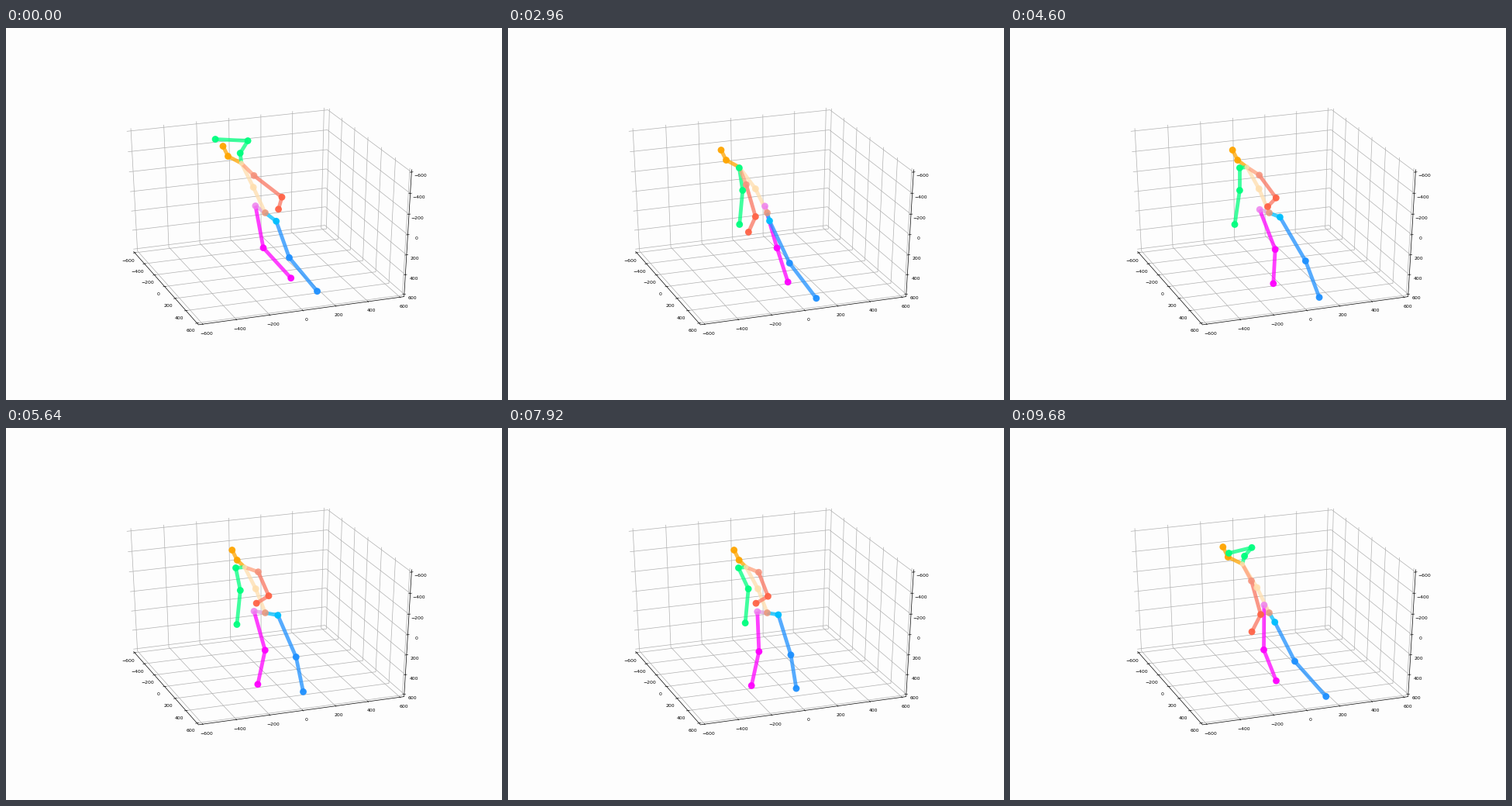
Animation, 640 px wide and 480 px high, one loop 9.72 s. Source, as a matplotlib script:

```python
import numpy as np
import matplotlib.pyplot as plt
from matplotlib.animation import FuncAnimation
from matplotlib.collections import LineCollection
from matplotlib.colors import to_rgba

W, H, FRAMES, STEP = 640, 480, 243, 40
PX = 0.72  # points per pixel at 100 dpi

fig = plt.figure(figsize=(6.4, 4.8), dpi=100, facecolor="#fdfdfd")
ax = fig.add_axes([0, 0, 1, 1])
ax.set_xlim(-0.5, W - 0.5)
ax.set_ylim(H - 0.5, -0.5)
ax.axis("off")

# ---- perspective box ----
ELEV, AZIM, DIST = np.radians(30), np.radians(20), 10
CENTER, SCALE = (334, 237.7), (2681, 1785)
EDGE = 25 / 48


def project(x, y, z):
    """Unit box coordinates to stage pixels."""
    se, ce, sa, ca = np.sin(ELEV), np.cos(ELEV), np.sin(AZIM), np.cos(AZIM)
    away = ca * y - sa * x
    depth = DIST - (away * ce + z * se)
    right = ca * x + sa * y
    up = z * ce - away * se
    return CENTER[0] + SCALE[0] * right / depth, CENTER[1] - SCALE[1] * up / depth


def path(*points):
    return [project(*p) for p in points]


def label(point, value, dx, dy):
    x, y = project(*point)
    ax.text(x + dx, y + dy, str(value).replace("-", "\u2212"), fontsize=6.1 * PX,
            family="DejaVu Sans", ha="center", va="center_baseline", color="black")


grid, ticks = [], []
OUT, IN = EDGE + 1 / 120, EDGE - 1 / 120
for value in range(-600, 601, 200):
    t = value / 1200
    grid.append(path((t, -EDGE, EDGE), (t, -EDGE, -EDGE), (t, EDGE, -EDGE)))
    grid.append(path((EDGE, t, EDGE), (EDGE, t, -EDGE), (-EDGE, t, -EDGE)))
    grid.append(path((-EDGE, -EDGE, t), (EDGE, -EDGE, t), (EDGE, EDGE, t)))
    ticks.append(path((t, IN, -EDGE), (t, OUT, -EDGE)))
    ticks.append(path((-IN, t, -EDGE), (-OUT, t, -EDGE)))
    ticks.append(path((IN, EDGE, t), (OUT, EDGE, t)))
    label((t, EDGE, -EDGE), value, 4.5, 11.5)
    label((-EDGE, t, -EDGE), value, -8.5, 9.5)
    label((EDGE, EDGE, -t), value, 11, 4.5)

frame_edges = path((-EDGE, -EDGE, -EDGE), (-EDGE, EDGE, -EDGE),
                   (EDGE, EDGE, -EDGE), (EDGE, EDGE, EDGE))
for lines, color, width in ((grid, "#b0b0b0", 0.7), ([frame_edges], "black", 0.7),
                            (ticks, "black", 0.6)):
    ax.add_collection(LineCollection(lines, colors=color, linewidths=width * PX))

# ---- body signals over the loop, in seconds ----
time = np.arange(FRAMES) * STEP / 1000


def ease(start, end):
    u = np.clip((time - start) / (end - start), 0, 1)
    return u * u * (3 - 2 * u)


signals = dict(
    lean=0.83 + 0.17 * ease(0, 1.2) - ease(1.5, 6.4) + 0.95 * ease(8.6, 9.68),
    turn=0.8 + 0.2 * ease(0, 1.4) - ease(1.5, 2.9) + 0.95 * ease(3, 5.2)
    - 0.65 * ease(7.2, 9.6),
    lift=1 - 0.1 * ease(0, 1.5) - 0.9 * ease(1.55, 2) + 0.8 * ease(9, 9.6),
    reach=1 - ease(0, 1.4) + 0.4 * (ease(3.4, 4.6) - ease(4.6, 6)),
    stride=0.1 + 0.7 * ease(0, 1.2) - 0.2 * ease(1.6, 2.8) + 0.4 * ease(3.2, 4.5)
    - ease(4.6, 6.6) + 0.6 * ease(7.5, 9.6),
    drift=ease(7, 8.9),
)

# ---- skeleton: each bone is a rest vector bent by the signals (x + yj, in pixels) ----
joints = {"pelvis": np.full(FRAMES, 334 + 238j)}
dot_colors, bone_colors, bones = ["#e9967a"], [], []


def bone(name, parent, color, rest, line=None, **bends):
    joints[name] = joints[parent] + rest + sum(
        amount * signals[key] for key, amount in bends.items())
    order = list(joints)
    bones.append((order.index(parent), order.index(name)))
    dot_colors.append(color)
    bone_colors.append(line or color)


MAGENTA, BLUE, SAND, ORANGE, GREEN, RED = (
    "#ff00ff", "#1e90ff", "#ffdead", "#ffa500", "#00ff7f", "#ff6347")

bone("hip_r", "pelvis", "#ee82ee", -3 - 1.5j, "#dda0dd", turn=-12, lean=-9j)
bone("knee_r", "hip_r", MAGENTA, 9 + 50j, stride=11, lean=5j, drift=-16 + 3j)
bone("foot_r", "knee_r", MAGENTA, -7 + 44j, lean=36, reach=14, stride=-12,
     drift=-4, lift=-5j)
bone("hip_l", "pelvis", "#00bfff", 3 + 2.5j, turn=14, lean=10j)
bone("knee_l", "hip_l", BLUE, 15 + 51.5j, stride=18 + 5j, lift=-5j)
bone("foot_l", "knee_l", BLUE, 7 + 43j, lean=35, stride=4j)

bone("spine", "pelvis", SAND, -12 - 31j, lean=-4, lift=-2j)
bone("chest", "spine", SAND, -21 - 28j, turn=7, lift=-3j)
bone("neck", "chest", ORANGE, -9 - 9j, lean=-10)
bone("head", "neck", ORANGE, -6.5 - 13j)

bone("shoulder_l", "chest", GREEN, 1j, turn=-12, lift=8 - 14j)
bone("elbow_l", "shoulder_l", GREEN, 11 + 29j, stride=-11, drift=5 - 4j, lift=-45j)
bone("hand_l", "elbow_l", GREEN, -4 + 44j, lift=-32 - 46j, reach=-6)
bone("shoulder_r", "chest", "#f4907a", 9 + 14j, "#ffa07a", turn=9 - 9j, lean=11j)
bone("elbow_r", "shoulder_r", RED, 12 + 31j, "#fa7560", lean=13j, reach=24 - 14j)
bone("hand_r", "elbow_r", RED, -9 + 9j, "#fa7560", turn=-8, lean=14j, reach=11 - 5j)

tracks = np.array(list(joints.values()))
tracks = np.stack([tracks.real, tracks.imag], axis=-1)

limbs = LineCollection([], colors=[to_rgba(c, 0.75) for c in bone_colors],
                       linewidths=4.8 * PX, zorder=3)
ax.add_collection(limbs)

soft = ("pelvis", "spine", "chest", "hip_r", "shoulder_r")
faces = [to_rgba(c, 0.85 if n in soft else 0.95) for n, c in zip(joints, dot_colors)]
sizes = [((6.5 if n == "chest" else 8.8) * PX) ** 2 for n in joints]
dots = ax.scatter(*tracks[:, 0].T, s=sizes, c=faces, linewidths=0, zorder=4)


def draw(i):
    pose = tracks[:, i]
    limbs.set_segments([pose[[a, b]] for a, b in bones])
    dots.set_offsets(pose)
    return limbs, dots


anim = FuncAnimation(fig, draw, frames=FRAMES, interval=STEP, repeat=True, repeat_delay=0)
plt.show()
```
